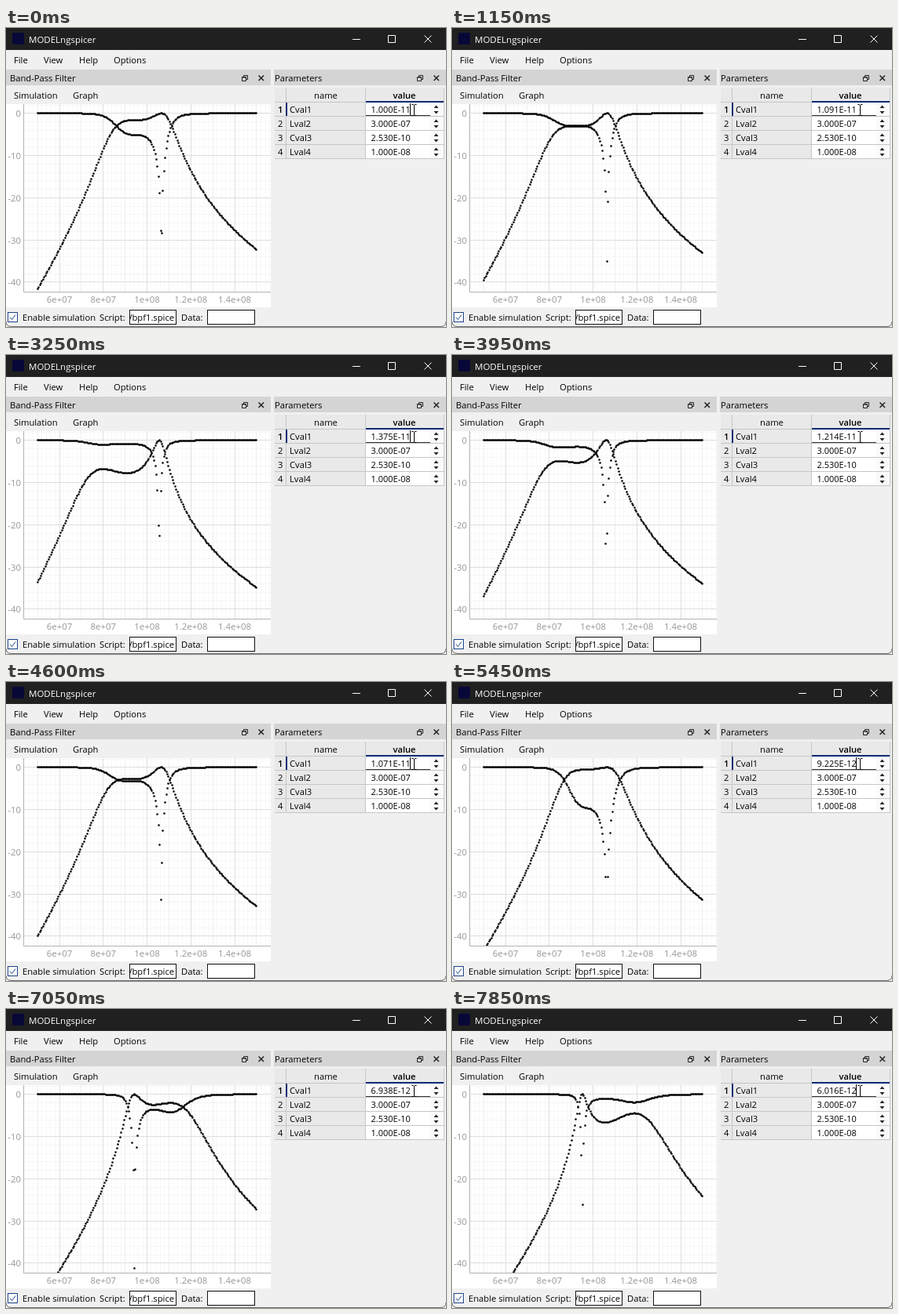
These frames come from a looping animation (560x381 px, 8000 ms). An HTML page:

```html
<!DOCTYPE html>
<html lang="en">
<head>
<meta charset="utf-8">
<title>MODELngspicer</title>
<style>
  html, body { margin: 0; width: 560px; height: 381px; overflow: hidden; background: #f0f0f0; }
  svg { display: block; font: 11.2px "Open Sans", "Noto Sans", sans-serif; fill: #000; }
  text { white-space: pre; }
  .title { fill: #fff; font-size: 11.5px; }
  .axis { fill: #969696; font-size: 11.4px; }
  .mid { text-anchor: middle; }
  .end { text-anchor: end; }
  .bold { font-weight: 600; }
  .value { font-size: 11px; }
  .icon { fill: none; stroke: #222; }
  .field { fill: #fff; stroke: #111; }
</style>
</head>
<body>
<svg width="560" height="381" viewBox="0 0 560 381">
  <defs>
    <clipPath id="view"><rect x="22" y="97" width="315" height="239"/></clipPath>
    <clipPath id="script"><rect x="158" y="360" width="59" height="18"/></clipPath>
    <g id="dockIcons" class="icon">
      <path d="M2.5 2.5V.5H7.5V5.5H5.5M.5 2.5H5.5V7.5H.5Z M.5 3H5.5"/>
      <path d="M21.5 .5L28 7M28 .5L21.5 7" stroke-width="1.5"/>
    </g>
  </defs>

  <!-- title bar -->
  <rect width="560" height="28" fill="#202020"/>
  <rect x="8" y="6" width="15" height="15" rx="2" fill="#080838"/>
  <text x="29" y="19" class="title">MODELngspicer</text>
  <path d="M441 14.5H451M486.5 9.5H495.5V18.5H486.5ZM532.5 9.5L541.5 18.5M541.5 9.5L532.5 18.5" fill="none" stroke="#fff"/>

  <!-- menus and dock titles -->
  <text x="10" y="45">File</text>
  <text x="48" y="45">View</text>
  <text x="93" y="45">Help</text>
  <text x="137" y="45">Options</text>
  <rect y="53" width="337" height="20" fill="#d4d4d4"/>
  <rect x="341" y="53" width="219" height="20" fill="#d4d4d4"/>
  <text x="5" y="68">Band-Pass Filter</text>
  <text x="342" y="68">Parameters</text>
  <use href="#dockIcons" x="300" y="60"/>
  <use href="#dockIcons" x="523" y="60"/>
  <text x="10" y="90">Simulation</text>
  <text x="85" y="90">Graph</text>

  <!-- plot -->
  <rect y="97" width="337" height="259" fill="#fff"/>
  <g id="grid" clip-path="url(#view)"></g>
  <path d="M22.5 97V336.5H337" fill="none" stroke="#b4b4b4"/>
  <g id="labels" class="axis"></g>
  <path id="dots" clip-path="url(#view)" fill="none" stroke="#000" stroke-width="2.7" stroke-linecap="round"/>

  <!-- bottom bar -->
  <rect x="2.5" y="362.5" width="12" height="12" fill="#fff" stroke="#1c4488"/>
  <path d="M5 368.5L7.5 371.5L12 365.5" fill="none" stroke="#1c4488"/>
  <text x="21" y="373">Enable simulation</text>
  <text x="119" y="373">Script:</text>
  <rect class="field" x="157.5" y="359.5" width="59" height="18"/>
  <text x="214" y="373" class="end" clip-path="url(#script)">/bpf1.spice</text>
  <text x="223" y="373">Data:</text>
  <rect class="field" x="256.5" y="359.5" width="60" height="18"/>

  <!-- parameter table -->
  <rect x="342" y="76" width="216" height="91" fill="#e9e9e9"/>
  <text x="407" y="90" class="mid">name</text>
  <text x="507" y="90" class="mid bold">value</text>
  <g id="rows"></g>
  <path d="M342 94.5H558M356.5 76V167M457.5 76V167M557.5 76V167" stroke="#c6c6c6"/>
  <path d="M458 94H557M357 95V112" stroke="#0c2c74" stroke-width="2"/>
  <path d="M458 111.5H540" stroke="#333"/>
  <rect id="caret" x="514" y="96" width="1" height="15"/>
  <path d="M516.5 97.5H518.5L519.5 98.5L520.5 97.5H522.5M519.5 98V111M516.5 111.5H518.5L519.5 110.5L520.5 111.5H522.5" fill="none" stroke="#000"/>

  <!-- window edge -->
  <path d="M0 374Q0 380.5 7 380.5H553Q560 380.5 560 374" fill="none" stroke="#666"/>
</svg>

<script>
const $ = id => document.getElementById(id);
const px = mhz => 40.2 + (mhz - 50) * 2.7875;
const py = db => 108.8 - db * 5.375;
// Centre of the pixel that holds v
const snap = v => Math.floor(v) + .5;

function buildGrid() {
  const vertical = (f, color) => `<path d="M${snap(px(f))} 97V336" stroke="${color}"/>`;
  const horizontal = (db, color) => `<path d="M22 ${snap(py(db))}H337" stroke="${color}"/>`;
  let fine = "", strong = "", labels = "";
  for (let f = 44; f <= 156; f += 2) {
    if (f % 20 === 0) strong += vertical(f, "#dedede");
    else if (f % 10 === 0) strong += vertical(f, "#eeeeee");
    else fine += vertical(f, "#f8f8f8");
  }
  for (let db = 2; db >= -42; db -= 2) {
    if (db % 10 === 0) strong += horizontal(db, "#dedede");
    else fine += horizontal(db, "#f6f6f6");
  }
  for (let f = 60; f <= 140; f += 20) {
    const name = f < 100 ? `${f / 10}e+07` : `${f / 100}e+08`;
    labels += `<text class="mid" x="${px(f)}" y="350">${name}</text>`;
  }
  for (let db = 0; db >= -40; db -= 10)
    labels += `<text class="end" x="19" y="${py(db) + 4.5}">${db}</text>`;
  $("grid").innerHTML = fine + strong;
  $("labels").innerHTML = labels;
}

function buildRows() {
  const rows = [["Cval1", "1.000E-11"], ["Lval2", "3.000E-07"], ["Cval3", "2.530E-10"], ["Lval4", "1.000E-08"]];
  $("rows").innerHTML = rows.map(([name, value], i) => {
    const y = 95 + 18 * i;
    return `<rect x="458" y="${y}" width="82" height="17" fill="#fff"/>
      <rect x="540" y="${y}" width="17" height="17" fill="#fafafa"/>
      <path d="M342 ${y + 17.5}H558" stroke="#c6c6c6"/>
      <path d="M544.5 ${y + 7}L547.5 ${y + 3.5}L550.5 ${y + 7}ZM544.5 ${y + 11}L547.5 ${y + 14.5}L550.5 ${y + 11}Z" fill="#222"/>
      <text x="346" y="${y + 13}" class="${i ? "" : "bold"}">${i + 1}</text>
      <text x="361" y="${y + 13}">${name}</text>
      <text x="464.5" y="${y + 13}" class="value">${value}</text>`;
  }).join("");
}

// Moments at which the spin box value changes
const changes = [
  600, 800, 1000, 1150, 1350, 1500, 1650, 1850, 2050, 2200, 2400, 2550,
  3250, 3400, 3550, 3650, 3800, 3950, 4050, 4200, 4350, 4500, 4600, 4700,
  4850, 4950, 5050, 5200, 5350, 5450, 5550, 5700, 5800, 5950, 6100, 6250,
  6400, 6500, 6650, 6800, 6900, 7050, 7200, 7300, 7450, 7600, 7750, 7850
];
// [time, number of 1 % steps away from 10 pF]
const stops = [
  [600, 2], [1500, 13], [2050, 24], [2550, 33], [3250, 32], [4200, 15],
  [4600, 6.9], [5450, -8.107], [6400, -25.1], [7850, -51.07]
];
const caretOff = [[1000, 1500], [2050, 2700], [3800, 4200], [4950, 5350], [5800, 6250], [6900, 7300]];

function stepsAt(t) {
  if (t <= stops[0][0]) return stops[0][1];
  const i = stops.findIndex(s => s[0] >= t);
  const [t0, n0] = stops[i - 1], [t1, n1] = stops[i];
  return n0 + (n1 - n0) * (t - t0) / (t1 - t0);
}

// T-network: series LC, shunt LC tank, series LC, between 50 ohm ports
function response(f, c1) {
  const w = 2 * Math.PI * f * 1e6, r = 50;
  const x = (w * 3e-7 - 1 / (w * c1)) / r;
  const y = (w * 2.53e-10 - 1 / (w * 1e-8)) * r;
  const b = x * (2 - x * y);
  const den = Math.hypot(2 * (1 - x * y), b + y);
  const db = v => 20 * Math.log10(Math.max(v, 1e-6));
  return [db(Math.abs(b - y) / den), db(2 / den)];
}

function show(c1) {
  let d = "";
  for (let k = 0; k < 200; k++) {
    const f = 50 + k * 100 / 199;
    for (const db of response(f, c1))
      if (db > -45) d += `M${snap(px(f))} ${snap(py(db))}h0`;
  }
  $("dots").setAttribute("d", d);
  document.querySelector(".value").textContent = c1.toExponential(3).toUpperCase();
}

let shown;
function tick() {
  const t = performance.now() % 8000;
  const last = changes.filter(c => c <= t).pop() || 0;
  if (last !== shown) {
    shown = last;
    show(last ? 1e-11 * 1.01 ** stepsAt(last) : 1e-11);
  }
  const off = caretOff.some(([a, b]) => t >= a && t < b);
  $("caret").setAttribute("visibility", off ? "hidden" : "visible");
  requestAnimationFrame(tick);
}

buildGrid();
buildRows();
tick();
</script>
</body>
</html>
```
